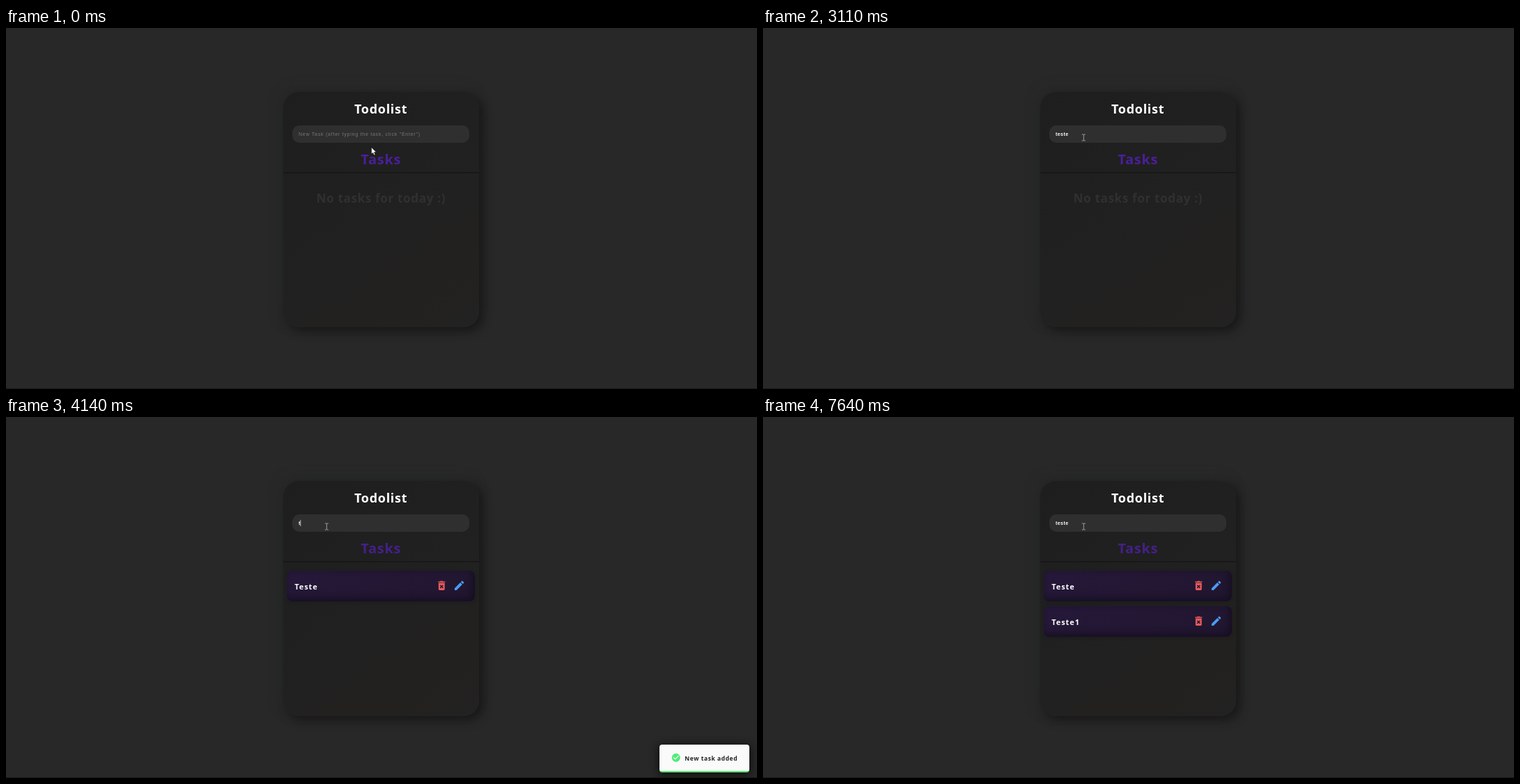
Animation, 1078 px wide and 519 px high, one loop 8000 ms. Source, as an HTML page:

```html
<!DOCTYPE html>
<html lang="en">
<head>
<meta charset="utf-8">
<title>Todolist</title>
<style>
  html, body { margin: 0; width: 100%; height: 100%; overflow: hidden; background: #282828; }
  div { position: absolute; box-sizing: border-box; }
  svg { position: absolute; left: 0; top: 0; overflow: visible; }
  text { font: 700 18px "Open Sans", "Noto Sans", sans-serif; white-space: pre; }
  #floor { left: 0; top: 518px; width: 1078px; height: 1px; background: #191919; }
  #card { left: 398px; top: 92px; width: 281px; height: 338px; border-radius: 22px;
    background: linear-gradient(145deg, #1e1e1e, #212121 60%, #23211f 80%, #222);
    box-shadow: 5px 5px 14px #161616, -5px -5px 16px #272928; }
  #field { left: 411px; top: 139.5px; width: 254px; height: 25.5px; border-radius: 10px; background: #2f2f2f; }
  #line { left: 398px; top: 207px; width: 281px; height: 2px; background: #181818; }
  .row { left: 403px; width: 270px; height: 44.5px; border-radius: 8px;
    background: linear-gradient(145deg, #251839, #21162f);
    box-shadow: inset -4px -4px 10px #160f22, 1px 1px 4px #1c1c1c; }
  .row text { font-size: 11px; letter-spacing: .9px; fill: #fff; }
  #toast { left: 938px; top: 471px; width: 129px; height: 39.5px; border-radius: 4px;
    background: #fafafa; border-bottom: 2px solid #48e869; box-shadow: 0 2px 12px 2px #111; }
  #toast text { font-size: 8.5px; letter-spacing: .55px; fill: #222; }
  #hint, #typed { font: 7px "Liberation Sans", Arial, sans-serif; }
  #hint { letter-spacing: .76px; fill: #777; }
  #typed { font-weight: 700; letter-spacing: .45px; fill: #fff; }
</style>
</head>
<body>
<div id="floor"></div>
<div id="card"></div>
<div id="field"></div>
<div id="line"></div>
<div id="rows"></div>
<svg width="1078" height="519">
  <text x="500" y="122.7" letter-spacing=".7" fill="#fff">Todolist</text>
  <text id="tasks" x="509.3" y="196" style="font-size:20px" letter-spacing=".7">Tasks</text>
  <text id="empty" x="445.5" y="251.3" style="font-size:17.2px" letter-spacing=".6" fill="#303030">No tasks for today :)</text>
  <text id="hint" x="420" y="154.8">New Task (after typing the task, click "Enter")</text>
  <text id="typed" x="420" y="154.8"></text>
  <rect id="caret" y="148" width=".8" height="9" fill="#ddd"/>
</svg>
<div id="toast">
  <svg width="129" height="39">
    <path fill="#50ec78" transform="translate(16.6 11.5) scale(.6)" d="M12 2C6.48 2 2 6.48 2 12s4.48 10 10 10 10-4.48 10-10S17.52 2 12 2zm-2 15l-5-5 1.41-1.41L10 14.17l7.59-7.59L19 8l-9 9z"/>
    <text x="36.3" y="22.6">New task added</text>
  </svg>
</div>
<svg width="1078" height="519">
  <path id="arrow" d="M0 0V9.8L2.3 7.8 3.8 11.2 5.5 10.4 4 7.1H7Z" fill="#fff" stroke="#111" stroke-width=".6"/>
  <path id="beam" d="M-2.5-4.5H-.6L0-4 .6-4.5H2.5M0-4V4M-2.5 4.5H-.6L0 4 .6 4.5H2.5" fill="none" stroke="#bbb" stroke-width=".8"/>
</svg>
<script>
const $ = id => document.getElementById(id);
const show = (el, on) => { el.style.visibility = on ? "visible" : "hidden"; };

const TRASH = "M6 19c0 1.1.9 2 2 2h8c1.1 0 2-.9 2-2V7H6v12zm2.46-7.12l1.41-1.41L12 12.59l2.12-2.12 1.41 1.41L13.41 14l2.12 2.12-1.41 1.41L12 15.41l-2.12 2.12-1.41-1.41L10.59 14l-2.13-2.12zM15.5 4l-1-1h-5l-1 1H5v2h14V4z";
const PENCIL = "M3 17.25V21h3.75L17.81 9.94l-3.75-3.75L3 17.25zM20.71 7.04c.39-.39.39-1.02 0-1.41l-2.34-2.34c-.39-.39-1.02-.39-1.41 0l-1.83 1.83 3.75 3.75 1.83-1.83z";
const icon = (x, color, d) =>
  `<path fill="${color}" transform="translate(${x} 21.3) scale(.74) translate(-12 -12)" d="${d}"/>`;
const addRow = (label, top) => {
  $("rows").insertAdjacentHTML("beforeend", `<div class="row" style="top:${top}px"><svg width="270" height="44">
    <text x="11.3" y="27">${label}</text>${icon(222.3, "#ea5b5b", TRASH)}${icon(247.6, "#4a9cf6", PENCIL)}</svg></div>`);
  return $("rows").lastChild;
};
const first = addRow("Teste", 220.8), second = addRow("Teste1", 271.5);

// [time, field text, caret x]
const typing = [
  [1150, "", 420], [2020, "t", 422.4], [2150, "te", 427.1], [2290, "tes", 431.4], [2420, "test", 434.2], [2550, "teste", 438.3],
  [3440, "", 420], [4140, "t", 422.4], [4210, "te", 427.1], [4350, "tes", 431.4], [4480, "test", 434.2], [5010, "teste", 438.3],
  [5610, "teste1", 443.3], [5970, "", 420],
  [6570, "t", 422.4], [6700, "te", 427.1], [6910, "tes", 431.4], [6970, "test", 434.2], [7110, "teste", 438.3]
];
// [time, x, y] of the pointer
const path = [
  [0, 524.5, 171.5], [250, 524.5, 171.5], [450, 538, 168], [640, 520, 164.8], [1020, 450.5, 163.3],
  [1100, 450.5, 163.3], [1150, 453, 165], [1210, 450.5, 163.3], [2760, 450.5, 163.3], [2960, 460.3, 157.5], [8000, 460.3, 157.5]
];
const BLINK = 530, ADDED = 3440, SLIDE = 600;

// CSS "ease" curve: find the parameter for x, return y
const ease = x => {
  let lo = 0, hi = 1, s;
  for (let i = 0; i < 20; i++) {
    s = (lo + hi) / 2;
    const cx = .75 * s * (1 - s) ** 2 + .75 * s * s * (1 - s) + s ** 3;
    if (cx < x) lo = s; else hi = s;
  }
  return .3 * s * (1 - s) ** 2 + 3 * s * s * (1 - s) + s ** 3;
};

function drawField(t) {
  const state = typing.findLast(k => k[0] <= t);
  const text = state ? state[1] : "";
  // submitting clears the text without restarting the blink
  const key = typing.findLast(k => k[0] <= t && (k[1] || k[0] === 1150));
  $("typed").textContent = text;
  show($("hint"), !text);
  show($("caret"), key && Math.floor((t - key[0]) / BLINK) % 2 === 0);
  if (state) $("caret").setAttribute("x", state[2]);
}

function drawPointer(t) {
  const i = path.findIndex(k => k[0] > t);
  const [t0, x0, y0] = path[i - 1], [t1, x1, y1] = path[i];
  const p = (t - t0) / (t1 - t0), x = x0 + (x1 - x0) * p, y = y0 + (y1 - y0) * p;
  const overField = y <= 165;
  show($("arrow"), !overField);
  show($("beam"), overField);
  for (const id of ["arrow", "beam"]) $(id).setAttribute("transform", `translate(${x} ${y})`);
}

function draw() {
  const t = performance.now() % 8000, added = t >= ADDED;
  drawField(t);
  drawPointer(t);
  show($("empty"), !added);
  show(first, added);
  show(second, t >= 5970);
  $("tasks").setAttribute("fill", added ? "#442089" : "#4a1f98");
  show($("toast"), added && t < 6500);
  const gap = 10 * (1 - ease(Math.min(1, Math.max(0, (t - ADDED) / SLIDE))));
  $("toast").style.transform = `translate(${gap}px, ${gap}px)`;
  requestAnimationFrame(draw);
}
draw();
</script>
</body>
</html>
```
